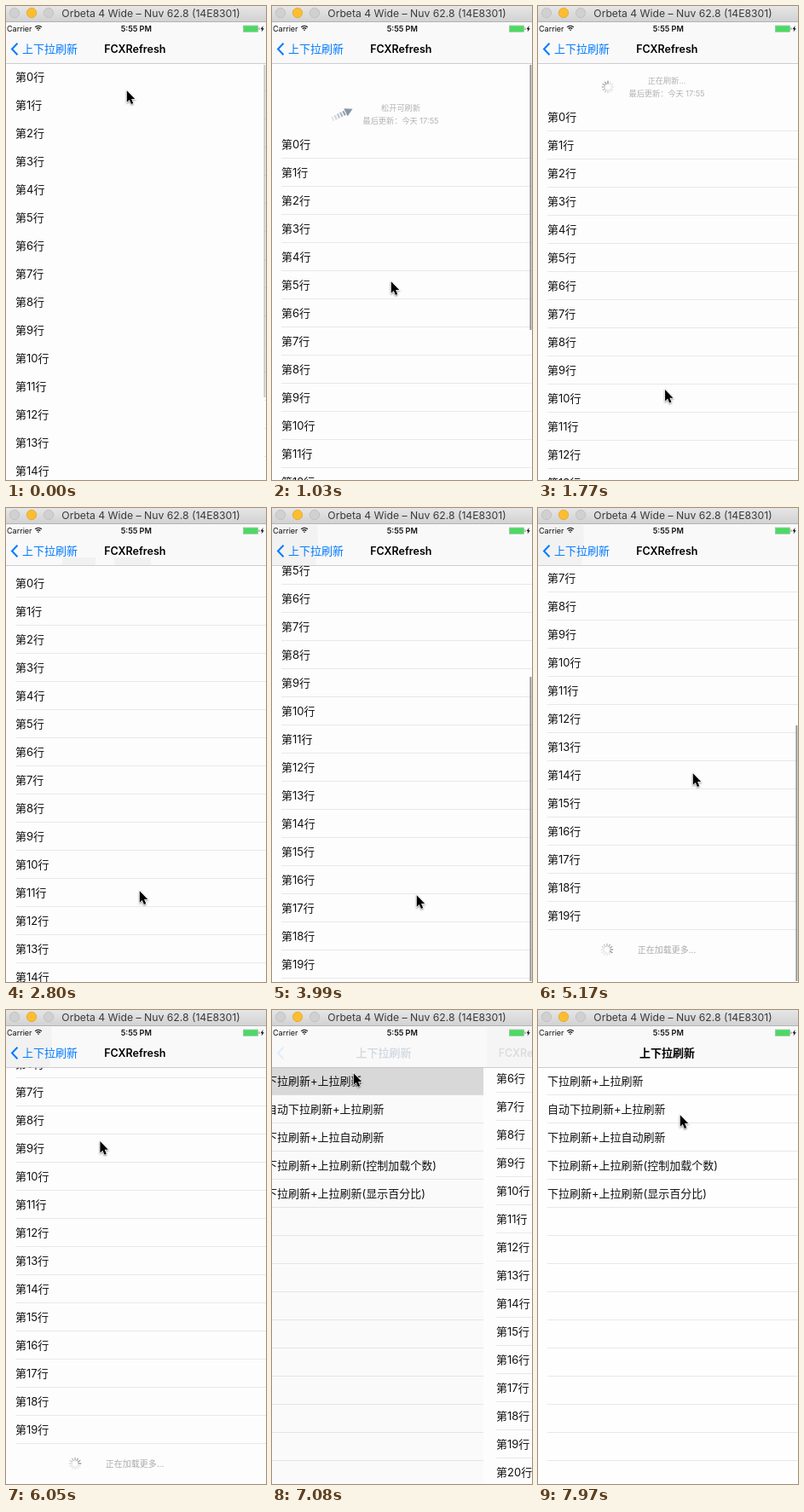
An HTML page with a canvas for the animation above (8000 ms loop, 305 by 556 pixels).

```html
<!DOCTYPE html>
<html lang="zh-CN">
<head>
<meta charset="utf-8">
<style>
html, body { margin: 0; width: 100%; height: 100%; overflow: hidden; background: #fff; }
canvas { display: block; width: 305px; height: 556px; }
</style>
</head>
<body>
<canvas></canvas>
<script>
const W = 305, H = 556, NAV = 67, ROW = 33, INSET = 47, LOOP = 8000, STEP = 147.6;
const FONT = 'Inter, "Noto Sans CJK SC", "Noto Sans CJK", sans-serif';
const BLUE = '#007aff', LINE = '#e8e8ea', CENTER = { align: 'center' };
const MENU = ['下拉刷新+上拉刷新', '自动下拉刷新+上拉刷新', '下拉刷新+上拉自动刷新',
  '下拉刷新+上拉刷新(控制加载个数)', '下拉刷新+上拉刷新(显示百分比)'];

const PULL = 5, RELEASE = 9, REFRESHED = 18, SWIPE = 22, LOAD = 30, LOADED = 41, BACK = 46;

// Pointer stops: [step, x, y]
const STOPS = [[0, 141, 99], [PULL, 151, 124], [7, 139, 323], [RELEASE, 145, 450], [19, 156, 449],
  [SWIPE, 157, 449], [25, 165, 300], [27, 169, 454], [LOAD, 173, 456], [35, 181, 311],
  [45, 62, 49], [BACK, 62, 49], [48, 95, 74], [54, 166, 123]];

const canvas = document.querySelector('canvas'), ctx = canvas.getContext('2d');
const dpr = window.devicePixelRatio || 1;
canvas.width = W * dpr;
canvas.height = H * dpr;

const clamp = v => Math.min(1, Math.max(0, v));
const easeOut = (k, from, to, power = 2) => 1 - (1 - clamp((k - from) / (to - from))) ** power;

function scrollAt(k) {
  const overPull = 59, bottom = 171, bounce = 4;
  const pull = -(INSET + overPull) * easeOut(k, PULL, RELEASE)
    + overPull * easeOut(k, RELEASE, RELEASE + 2)
    + INSET * easeOut(k, REFRESHED, REFRESHED + 2, 3.25);
  const swipe = (bottom + bounce) * easeOut(k, SWIPE, SWIPE + 4) - bounce * easeOut(k, 27, 29);
  const load = 61 * easeOut(k, LOAD, LOAD + 4) - 14 * easeOut(k, 35, 37) - 17 * easeOut(k, LOADED, LOADED + 1);
  return Math.round(pull + swipe + load);
}

function pointerAt(k) {
  const next = STOPS.findIndex(stop => stop[0] > k);
  if (next < 0) return STOPS[STOPS.length - 1].slice(1);
  const [k0, x0, y0] = STOPS[next - 1], [k1, x1, y1] = STOPS[next];
  const p = (k - k0) / (k1 - k0);
  return [x0 + (x1 - x0) * p, y0 + (y1 - y0) * p];
}

function scrollbarAlpha(k) {
  const spans = [[-2, -1], [PULL + 1, RELEASE], [SWIPE, 28], [LOAD + 1, 36]];
  return Math.max(...spans.map(([from, to]) => k < from ? 0 : clamp(1 - (k - to) / 2)));
}

function rect(x, y, w, h, color) {
  ctx.fillStyle = color;
  ctx.fillRect(x, y, w, h);
}

function text(str, x, y, size, color, { weight = 400, align = 'left', alpha = 1 } = {}) {
  ctx.font = `${weight} ${size}px ${FONT}`;
  ctx.textAlign = align;
  ctx.fillStyle = color;
  ctx.globalAlpha = alpha;
  ctx.fillText(str, x, y);
  ctx.globalAlpha = 1;
}

function poly(points, color) {
  ctx.beginPath();
  points.forEach(([x, y]) => ctx.lineTo(x, y));
  ctx.closePath();
  ctx.fillStyle = color;
  ctx.fill();
}

function circle(x, y, r, fill, stroke) {
  ctx.beginPath();
  ctx.arc(x, y, r, 0, 7);
  ctx.fillStyle = fill;
  ctx.fill();
  ctx.strokeStyle = stroke;
  ctx.lineWidth = .7;
  ctx.stroke();
}

function at(x, y, degrees, draw) {
  ctx.save();
  ctx.translate(x, y);
  ctx.rotate(degrees * Math.PI / 180);
  draw();
  ctx.restore();
}

function spinner(x, y, k) {
  const lead = Math.floor(k * 1.77);
  for (let i = 0; i < 12; i++) {
    const age = (lead - i + 12) % 12;
    at(x, y, i * 30, () => rect(3.4, -.6, 3.9, 1.2, `rgba(110,110,115,${Math.max(.2, .85 - age * .09)})`));
  }
}

function arrow(x, y, degrees) {
  at(x, y, degrees, () => {
    for (let i = 0; i < 5; i++) rect(-13 + i * 3.7, -2.8, 2.2, 5.6, `rgba(135,148,163,${.2 + i * .17})`);
    poly([[5, -5], [14, 0], [5, 5]], '#8796a8');
  });
}

function drawHeader(top, k) {
  const pulled = k > PULL + 1, refreshing = k > RELEASE;
  const label = refreshing ? '正在刷新...' : pulled ? '松开可刷新' : '下拉可刷新';
  text(label, 151, top - 23, 9.2, '#b2b2b2', CENTER);
  text('最后更新：今天 17:55', 151, top - 8, 9.2, '#b2b2b2', CENTER);
  if (refreshing) spinner(82, top - 19, k);
  else arrow(82, top - 19, 90 - 180 * easeOut(k, PULL + 1, PULL + 3, 1.5));
}

function drawFooter(top, k) {
  const loading = k >= LOAD + 4;
  text(loading ? '正在加载更多...' : '上拉可加载更多', 151, top + 27, 10, '#aaa', CENTER);
  if (loading) spinner(81, top + 23, k);
  else arrow(81, top + 23, -90);
}

function drawScrollbar(scroll, k) {
  const full = k < SWIPE ? 390 : 361, bottom = 171;
  const length = full - Math.max(0, -scroll, scroll - bottom);
  ctx.globalAlpha = scrollbarAlpha(k);
  rect(302.4, 69 + clamp(scroll / bottom) * (486 - length), 2, length, '#949494');
  ctx.globalAlpha = 1;
}

function drawList(scroll, k) {
  const rows = k > LOADED ? 40 : 20, top = NAV - scroll;
  const lineX = k > PULL ? 11 : 303;
  rect(-4, 0, W + 4, H, '#fdfdfd');
  for (let i = 0; i < rows; i++) {
    const y = top + i * ROW;
    text(`第${i}行`, 11, y + 21, 13, '#111');
    rect(lineX, y + 32, W - lineX, 1, LINE);
  }
  if (scroll < 0) drawHeader(top, k);
  drawFooter(top + rows * ROW, k);
  drawScrollbar(scroll, k);
}

function drawMenu(highlight) {
  rect(0, 0, W + 100, H, '#fefefe');
  for (let y = NAV; y < H; y += ROW) rect(11, y + 32, W, 1, LINE);
  rect(0, NAV, W + 100, 32.5, `rgba(219,219,219,${highlight})`);
  MENU.forEach((label, i) => text(label, 11, NAV + i * ROW + 21, 13, '#111'));
}

function drawNav(scroll, pop, panelX, k) {
  rect(0, 19, W, NAV - 19, '#f9f9f9');
  // Content showing faintly through the translucent bar.
  if (scroll > 20) {
    ctx.globalAlpha = 1 - pop * .6;
    at(panelX, 0, 0, () => poly([[0, 20], [53, 20], [54, 38], [51, NAV], [0, NAV]], '#f2f2f2'));
    ctx.globalAlpha = 1;
  } else if (k > REFRESHED && scroll < 0) {
    rect(66, 58, 39, 9, '#f1f1f1');
    rect(127, 58, 43, 9, '#f1f1f1');
  }
  rect(0, NAV, W, .8, '#c4c4c6');

  const title = '上下拉刷新', titleX = 51.5 + 100 * pop ** 1.2;
  const fade = clamp(1 - 1.1 * pop);
  ctx.globalAlpha = fade;
  ctx.strokeStyle = BLUE;
  ctx.lineWidth = 2;
  ctx.beginPath();
  ctx.moveTo(13.5, 43.8);
  ctx.lineTo(7, 50.5);
  ctx.lineTo(13.5, 57.2);
  ctx.stroke();
  text(title, titleX, 55, 13, BLUE, { ...CENTER, alpha: fade });
  text(title, titleX, 55, 13, '#000', { ...CENTER, weight: 700, alpha: pop ** 13 });
  text('FCXRefresh', 151.3 + 182 * pop, 55, 12.5, '#000', { ...CENTER, weight: 600, alpha: (1 - pop) ** 1.3 });
}

function drawStatus() {
  text('Carrier', 1, 30, 9, '#111');
  text('5:55 PM', 152.8, 30, 9.1, '#111', { weight: 600, align: 'center' });
  ctx.strokeStyle = '#111';
  ctx.lineWidth = 1.3;
  for (const r of [1, 3.4, 5.8]) {
    ctx.beginPath();
    ctx.arc(38, 29.2, r, -2.3, -.84);
    ctx.stroke();
  }
  rect(278.5, 23.2, 17, 7, '#4cd964');
  ctx.strokeStyle = '#93b89a';
  ctx.lineWidth = .6;
  ctx.strokeRect(278.3, 23, 17.4, 7.4);
  rect(296.5, 25.4, 1, 2.6, '#888');
  poly([[301.6, 23], [298.6, 27.2], [300.4, 27.2], [299.6, 30.6], [302.8, 26.2], [301, 26.2]], '#111');
}

function drawTitleBar() {
  const shade = ctx.createLinearGradient(0, 0, 0, 19);
  shade.addColorStop(0, '#e6e6e6');
  shade.addColorStop(1, '#d1d1d1');
  rect(0, 0, W, 19, shade);
  rect(0, 18, W, 1, '#b4b4b4');
  circle(10, 8, 5.7, '#d0d0d0', '#b9b9b9');
  circle(30, 8, 5.7, '#fdbd30', '#dfa023');
  circle(50, 8, 5.7, '#d0d0d0', '#b9b9b9');
  text('Orbeta 4 Wide – Nuv 62.8 (14E8301)', 170, 13, 12.2, '#3a3a3a', CENTER);
}

function drawPointer([x, y]) {
  at(x + .8, y + .3, 0, () => {
    const shape = [[0, 0], [0, 13.4], [3, 10.6], [5.1, 15.6], [7.4, 14.6], [5.3, 9.7], [9.4, 9.7]];
    ctx.shadowColor = 'rgba(0,0,0,.35)';
    ctx.shadowBlur = 2 * dpr;
    ctx.shadowOffsetY = dpr;
    poly(shape, '#000');
    ctx.strokeStyle = '#fff';
    ctx.lineWidth = 1.4;
    ctx.stroke();
    ctx.shadowColor = 'transparent';
    poly(shape, '#000');
  });
}

function render(now) {
  const k = Math.floor((now % LOOP + 13) / STEP);
  const scroll = scrollAt(k);
  const pop = easeOut(k, BACK, BACK + 4, 2.53);
  const panelX = Math.round(W * pop);
  ctx.setTransform(dpr, 0, 0, dpr, 0, 0);
  if (pop > 0) {
    at(Math.round(-105 * (1 - pop)), 0, 0, () => drawMenu(1 - easeOut(k, BACK + 2, BACK + 5, 1)));
    rect(0, 0, W, H, `rgba(0,0,0,${.08 * (1 - pop)})`);
  }
  if (pop < 1) at(panelX, 0, 0, () => drawList(scroll, k));
  drawNav(scroll, pop, panelX, k);
  drawStatus();
  drawTitleBar();
  drawPointer(pointerAt(k));
}

const start = performance.now();
function tick() {
  render(performance.now() - start);
  requestAnimationFrame(tick);
}
tick();
</script>
</body>
</html>
```
